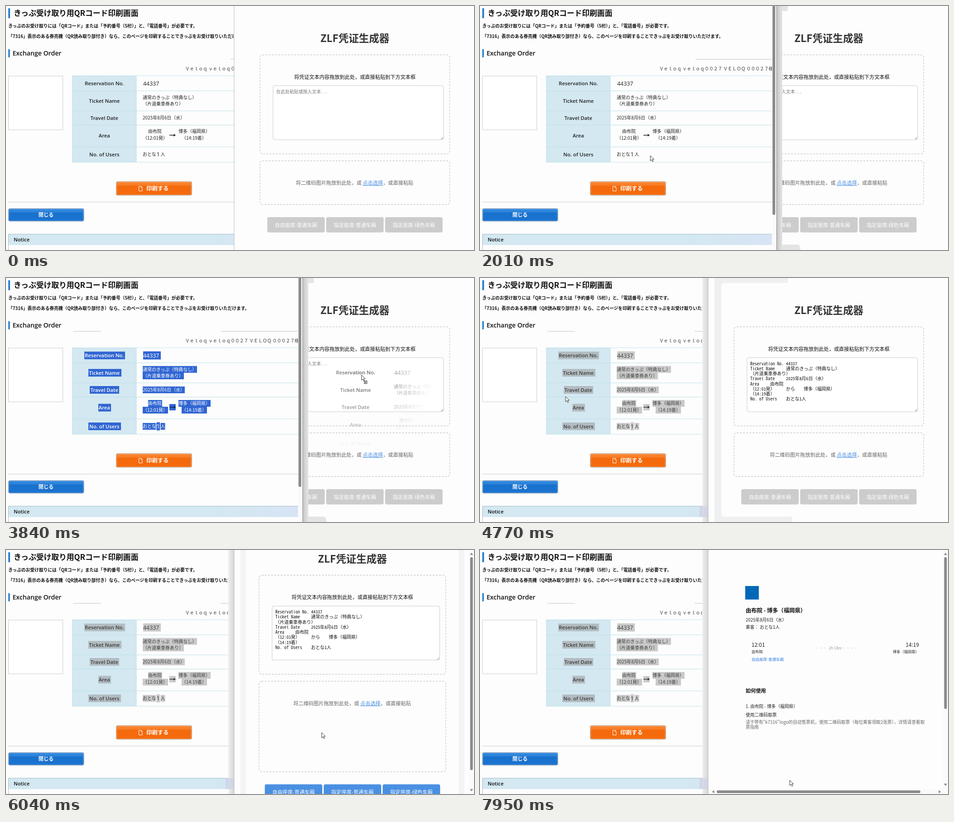
An HTML page that plays this animation: 1034 by 542 pixels, repeating every 8000 ms.

```html
<!DOCTYPE html>
<html lang="ja">
<head>
<meta charset="utf-8">
<style>
html, body { margin: 0; width: 100%; height: 100%; overflow: hidden; background: #fdfdfd; }
svg { display: block; width: 1034px; height: 542px; }
text { font-family: "Noto Sans CJK JP", "Noto Sans CJK SC", sans-serif; white-space: pre; }
.la { font-family: "Open Sans", "Noto Sans CJK JP", sans-serif; }
.sc { font-family: "Noto Sans CJK SC", "Noto Sans CJK JP", sans-serif; }
.mo { font-family: "Noto Sans Mono CJK JP", "Noto Sans Mono CJK SC", monospace; }
</style>
</head>
<body>
<svg id="stage" viewBox="0 0 1034 542"></svg>
<script>
const $ = id => document.getElementById(id);

// y is the vertical middle of the line
const text = (x, y, size, str, o = {}) =>
  `<text x="${x}" y="${(y + size * 0.37).toFixed(2)}" font-size="${size}" fill="${o.fill || '#222'}"` +
  ` font-weight="${o.w || 400}" text-anchor="${o.a || 'start'}" class="${o.c || ''}">${str}</text>`;
const rect = (x, y, w, h, fill, more = '') =>
  `<rect x="${x}" y="${y}" width="${w}" height="${h}" fill="${fill}" ${more}/>`;
const line = (x1, y1, x2, y2, stroke, w = 1) =>
  `<path d="M${x1} ${y1}L${x2} ${y2}" stroke="${stroke}" stroke-width="${w}" fill="none"/>`;
const path = (d, fill, more = '') => `<path d="${d}" fill="${fill}" ${more}/>`;
const group = (id, body, more = '') => `<g id="${id}" ${more}>${body}</g>`;

// ---- selectable table contents, in reading order: x, y, text, x0, x1
const label = (y, str, x0, x1) =>
  ({ x0, x1, y, h: 17, head: true, svg: text(217.3, y, 11.3, str, { c: 'la', w: 600, a: 'middle', fill: 'inherit' }) });
const value = (x, y, str, x1, size = 10, h = 15) =>
  ({ x0: x, x1, y, h, svg: text(x, y, size, str, { c: size > 11 ? 'la' : '', fill: 'inherit' }) });
const items = [
  label(172, 'Reservation No.', 173, 263), value(303, 172, '44337', 342, 12.4, 18),
  label(210.5, 'Ticket Name', 182, 255), value(302, 203, '通常のきっぷ（特典なし）', 422),
  value(302, 217.5, '（片道乗車券あり）', 393),
  label(248.5, 'Travel Date', 185, 250), value(302, 248.5, '2025年8月6日（水）', 395),
  label(288, 'Area', 204, 232), value(314, 278.5, '由布院', 345),
  value(302, 293.5, '（12:01発）', 358),
  { x0: 361, x1: 375, y: 287, h: 14,
    svg: '<path d="M361 287h11" stroke="inherit" stroke-width="1.5" class="arrow"/><path d="M370.5 284l4.500 3l-4.500 3z"/>' },
  value(381, 278.5, '博多（福岡県）', 452), value(388, 293.5, '（14:19着）', 444),
  label(329.5, 'No. of Users', 182, 254), value(302, 329.5, 'おとな', 331),
  value(332.5, 329.5, '1', 340, 13, 18), value(341.5, 329.5, '人', 351.5)
];
const itemSvg = (it, cls) =>
  `<g class="${cls}" fill="#222">` + (cls === 'item' ? rect(it.x0, it.y - it.h / 2, it.x1 - it.x0, it.h, 'none') : '') +
  it.svg.replace('stroke="inherit"', 'stroke="#111"') + '</g>';

// ---- booking page on the left
const rows = [155, 188.5, 233, 264.5, 313, 347];
function booking() {
  const bold = { w: 700, fill: '#111' };
  return rect(0, 0, 656, 542, '#fdfdfd') +
    rect(5, 5, 4, 22, '#2a80d6') +
    text(17, 16, 16.8, 'きっぷ受け取り用QRコード印刷画面', bold) +
    text(5, 44, 9.75, 'きっぷのお受け取りには「QRコード」または「予約番号（5桁）」と、「電話番号」が必要です。', bold) +
    text(5, 67.500, 9.75, '「7316」表示のある券売機（QR読み取り部付き）なら、このページを印刷することできっぷをお受け取りいただけます。', bold) +
    rect(5, 96, 3.5, 18, '#2a80d6') +
    text(14.5, 105, 14.1, 'Exchange Order', { c: 'la', w: 600, fill: '#111' }) +
    text(396, 139, 9.8, 'Ｖｅｌｏｑ ｖｅｌｏｑ００２７ ＶＥＬＯＱ ０００２７様', { fill: '#333' }) +
    group('rule', '') +
    rect(5.5, 155.5, 120, 119.500, '#fff', 'stroke="#ccc"') +
    rect(146, 155, 142, 192, '#d3e8f1') +
    rows.map(y => line(146, y, 645, y, '#bfe0e8')).join('') +
    line(288, 155, 288, 347, '#bfe0e8') + line(146.5, 155, 146.5, 347, '#bfe0e8') +
    items.map(it => itemSvg(it, 'item')).join('') +
    rect(243.5, 390, 167, 30.5, 'url(#orange)', 'rx="3" stroke="#aaa"') +
    rect(244.8, 391.3, 164.4, 28, 'none', 'rx="2" stroke="#ffb27a" stroke-width=".8"') +
    path('M293.500 400.500h5l2.500 2.500v8h-7.500zM298.500 400.500v2.500h2.500', 'none', 'stroke="#fff"') +
    text(310, 405, 12.4, '印刷する', { w: 700, fill: '#fff' }) +
    line(5, 435.5, 645, 435.5, '#ccc') +
    rect(5.5, 450, 166.5, 28, 'url(#blue)', 'rx="3" stroke="#999"') +
    rect(6.700, 451.2, 164, 25.6, 'none', 'rx="2" stroke="#5aa4ea" stroke-width=".8"') +
    text(88.5, 463.5, 11.2, '閉じる', { w: 700, fill: '#fff', a: 'middle' }) +
    rect(5, 507, 640, 24, 'url(#notice)') +
    path('M645 506.800H5.500V542', 'none', 'stroke="#9fbccb"') +
    text(17, 519, 11.2, 'Notice', { c: 'la', w: 600, fill: '#111' });
}

// ---- voucher form on the right
const buttons = ['自由座席-普通车厢', '指定座席-普通车厢', '指定座席-绿色车厢'];
const ticketText = [
  [[0, 'Reservation No. 44337']],
  [[0, 'Ticket Name'], [79, '通常のきっぷ（特典なし）']],
  [[0, '（片道乗車券あり）']],
  [[0, 'Travel Date'], [79, '2025年8月6日（水）']],
  [[0, 'Area'], [44, '由布院']],
  [[0, '（12:01発）'], [79, 'から'], [118, '博多（福岡県）']],
  [[0, '（14:19着）']],
  [[0, 'No. of Users'], [79, 'おとな1人']]
];
const mono = (x, y) => ticketText.map((row, i) => row.map(([dx, s]) =>
  text(x + dx, y + i * 11.25, 9.9, s, { c: 'mo', fill: '#111' })).join('')).join('');

function form(cx, half, dy, grow, active) {
  const x = cx - half, w = half * 2, sc = (fill, wt) => ({ c: 'sc', fill, w: wt, a: 'middle' });
  const dashed = (y, h) => rect(x, y + dy, w, h, 'none', 'rx="6" stroke="#ccc" stroke-width="1.4" stroke-dasharray="4.200 2.800"');
  const tx = x + 29, tw = w - 42.5, ex = tx + tw, ey = 297 + dy;
  const hint = cx - 130.5;
  return text(cx, 72 + dy, 22.5, 'ZLF凭证生成器', sc('#333', 700)) +
    dashed(108.5, 220) + dashed(344, 97 + grow) +
    text(cx, 157.5 + dy, 11.2, '将凭证文本内容拖放到此处，或直接粘贴到下方文本框', sc('#111', 500)) +
    rect(tx, 177 + dy, tw, 120, '#fff', 'rx="3" stroke="#ccc"') +
    line(ex - 6, ey - 1, ex - 1, ey - 6, '#888') + line(ex - 3, ey - 1, ex - 1, ey - 3, '#888') +
    (active ? '' : group('empty', text(tx + 7, 190, 9.9, '在此处粘贴或拖入文本...', { c: 'mo', fill: '#777' }))) +
    group(active ? 'typed2' : 'typed', mono(tx + 7, 190 + dy)) +
    text(hint, 393 + dy, 11.2, '将二维码图片拖放到此处，或 <tspan fill="#4a90e2" text-decoration="underline">点击选择</tspan>，或直接粘贴', { c: 'sc', fill: '#666' }) +
    buttons.map((s, i) => rect(cx - 193.5 + i * 130.2, 469 + dy + grow, 127, 34, active ? '#4a90e2' : '#ccc', 'rx="4"') +
      text(cx - 130 + i * 130.2, 486.5 + dy + grow, 11.2, s, sc('#fff', 500))).join('');
}

function result() {
  const t = (x, y, size, s, fill = '#222', w = 400, a = 'start') => text(x, y, size, s, { c: 'sc', fill, w, a });
  const dots = [735, 744, 753, 762, 804, 813, 821, 830].map(x => rect(x - .7, 217, 1.4, 1.4, '#bbb')).join('');
  return rect(586, 80, 30, 30, '#0068b7') +
    t(587, 134, 12.3, '由布院 - 博多（福岡県）', '#111', 700) +
    t(587, 155.5, 9.7, '2025年8月6日（水）') + t(587, 171, 9.7, '乘客： おとな1人') +
    t(600, 211, 11.8, '12:01', '#222', 500) + t(970, 211, 11.8, '14:19', '#222', 500, 'end') +
    t(600, 225.5, 8.3, '由布院', '#222', 500) + t(970, 225.5, 8.3, '博多（福岡県）', '#222', 500, 'end') +
    dots + t(785, 217.5, 8.3, '2h 18m', '#999', 400, 'middle') +
    t(600, 243, 8.5, '自由座席-普通车厢', '#2f7de1') +
    t(587, 312.5, 11.2, '如何使用', '#111', 700) +
    t(587, 347, 9.7, '1. 由布院 - 博多（福岡県）', '#222', 500) +
    t(587, 366.5, 9.8, '使用二维码取票', '#222', 500) +
    t(587, 382, 9.7, '请于带有"k7316"logo的自动售票机，使用二维码取票（每位乘客领取2张票），详情请查看取', '#666') +
    t(587, 393.5, 9.7, '票指南', '#666');
}

// ---- scrollbars, window edges and pointers
const grey = '#8a8a8a';
const vBar = (id, h, end) => rect(1023, 0, 11, 542, '#fafafa') +
  path(`M1025 11l3.500-5l3.500 5zM1025 ${end}l3.500 5l3.500-5z`, grey) +
  rect(1025.5, 16, 6, h, grey, `rx="3" id="${id}"`);
const hBar = rect(505, 531, 529, 11, '#fafafa') + rect(523, 534, 450, 6, grey, 'rx="3"') +
  path('M517.500 533.500l-5 3.500l5 3.500zM1013.500 533.500l5 3.500l-5 3.500z', grey);

const leftEdge = rect(645, 0, 10, 542, '#fafafa') + rect(646.3, -9, 6, 473, grey, 'rx="3"') +
  rect(655, 0, 13, 542, 'url(#shade)') + line(655.5, 0, 655.5, 542, '#858585') +
  path('M668 0h12v11h-12zM668 530h36q4 5 4 12h-40z', '#e3e4e6');
const rightEdge = rect(491, 0, 13, 542, 'url(#shade2)') + rect(485, 507, 19, 24, '#cbd0e6', 'opacity=".7"');
const bands = path('M518 0H680V11H541q-8 0-8 8V522q0 8 8 8H690V542H518z', '#eff0f2');
const bands2 = rect(518, 0, 12, 542, '#f3f4f6') + rect(1000, 0, 13, 542, '#f3f4f6');

const arrow = path('M.5.5v11.500l2.700-2.500l2 4.200l1.900-.9l-2-4.100h3.400z', '#fff', 'stroke="#222" stroke-width=".9"');
const plus = rect(6.5, 13.5, 6, 6, '#fff', 'stroke="#333"') + path('M9.500 14.500v4M7.500 16.500h4', 'none', 'stroke="#333"');
const noDrop = '<circle r="4.700" fill="#fff" stroke="#d0202c" stroke-width="1.800"/>' + line(-3.3, -3.3, 3.3, 3.3, '#d0202c', 1.8);

const grad = (id, a, b, dir) => `<linearGradient id="${id}" ${dir}><stop stop-color="${a}"/><stop offset="1" stop-color="${b}"/></linearGradient>`;
const down = 'x2="0" y2="1"';
$('stage').innerHTML = `<defs>
  <linearGradient id="orange" ${down}><stop stop-color="#fb8a35"/><stop offset=".3" stop-color="#f87a22"/><stop offset=".31" stop-color="#f46a0c"/><stop offset="1" stop-color="#f46a0c"/></linearGradient>
  <linearGradient id="blue" ${down}><stop stop-color="#3a8ee2"/><stop offset=".3" stop-color="#2780d8"/><stop offset=".31" stop-color="#1a72cf"/><stop offset="1" stop-color="#1a72cf"/></linearGradient>
  ${grad('notice', '#d3e8f1', '#d8e4f5', 'x1=".7"')}${grad('shade', '#c4c4c4', '#e6e6e6', '')}${grad('shade2', '#f0f0f0', '#d6d6d6', '')}
  <clipPath id="clip"><rect id="pane" width="504" height="542"/></clipPath>
  <radialGradient id="fade" gradientUnits="userSpaceOnUse" cx="225" cy="177" r="165">
    <stop stop-color="#fff" stop-opacity=".75"/><stop offset=".5" stop-color="#fff" stop-opacity=".45"/><stop offset="1" stop-color="#fff" stop-opacity="0"/></radialGradient>
  <mask id="soft" maskUnits="userSpaceOnUse" x="0" y="0" width="700" height="542">${rect(0, 0, 700, 542, 'url(#fade)')}</mask></defs>` +
  rect(0, 0, 1034, 542, '#fdfdfd') +
  group('bands', bands) + group('bands2', bands2) +
  group('form1', form(770.7, 209.7, 0, 0, false)) +
  group('form2', form(765.3, 206.3, -52.500, 104, true)) +
  group('result', result()) +
  group('bars1', vBar('thumb', 473, 531)) + group('bars2', vBar('thumb2', 337, 519) + hBar) +
  group('left', booking(), 'clip-path="url(#clip)"') +
  group('edgeL', leftEdge) + group('edgeR', rightEdge) + group('seam', line(504, 0, 504, 542, '#bbb')) +
  group('ghost', items.map(it => itemSvg(it, 'copy')).join(''), 'mask="url(#soft)"') +
  group('image', rect(0, 0, 104, 105, '#d0d0d0', 'opacity=".75"')) +
  group('pointer', arrow) + group('plus', arrow + plus) + group('noDrop', noDrop);

// ---- timing
const track = (keys, t) => {
  const i = keys.findIndex(k => k[0] > t);
  if (i < 0) return keys[keys.length - 1].slice(1);
  if (!i) return keys[0].slice(1);
  const a = keys[i - 1], b = keys[i], p = (t - a[0]) / (b[0] - a[0]);
  return [a[1] + (b[1] - a[1]) * p, a[2] + (b[2] - a[2]) * p];
};
const mouse = [[260, 700, 536], [520, 585, 440], [800, 462, 345], [1020, 425, 311], [1070, 424, 305], [1250, 400, 316],
  [1480, 376, 332], [2010, 376, 332], [2200, 354, 336], [2500, 262, 258], [2800, 157, 170], [2850, 157, 170], [2930, 154, 165],
  [3120, 154, 165], [3260, 222, 175], [3560, 222, 175], [3680, 470, 188], [3840, 785, 215], [4070, 794, 214],
  [4260, 794, 214], [4500, 520, 250], [4770, 189, 263], [5050, 55, 222], [5110, 55, 222], [5380, 411, 318],
  [5620, 610, 378], [5850, 697, 405], [6040, 697, 405], [6350, 692, 460], [6660, 688, 501], [6870, 688, 501], [7200, 684, 511]];
const picture = [[5110, 13, 163], [5380, 289, 235], [5620, 545, 315], [5850, 655, 346]];

const show = (id, on) => $(id).style.display = on ? '' : 'none';
const move = (id, x, y) => $(id).setAttribute('transform', `translate(${x.toFixed(2)} ${y.toFixed(2)})`);
const within = (t, a, b) => t >= a && t < b;
const cells = [...document.querySelectorAll('.item')];

function draw(t) {
  const raised = within(t, 2010, 4260) || within(t, 5110, 6040);
  const pasted = t >= 4260, dropped = t >= 6040, done = t >= 7670;
  $('pane').setAttribute('width', raised ? 656 : 504);
  show('edgeL', raised);
  show('edgeR', !raised && pasted);
  show('seam', !raised);
  show('bands', !raised && within(t, 4260, 6040));
  show('bands2', dropped && !done);
  show('form1', !dropped);
  show('form2', dropped && !done);
  show('result', done);
  show('bars1', dropped && !done);
  show('bars2', done);
  show('empty', !pasted);
  show('typed', pasted);

  const scroll = Math.min(1, Math.max(0, (t - 6870) / 280));
  move('form2', 0, -41 * scroll);
  move('thumb', 0, 38 * scroll);

  const rule = x => line(x, 118.5, 645, 118.5, '#ddd', 2);
  $('rule').innerHTML = rule(t < 2010 ? 496 : t < 4260 ? 476 : 474) +
    (t >= 3260 ? line(149, 118.500, 210, 118.500, '#ddd', 2) : '');

  // selection grows backwards from the last cell
  const picked = Math.floor(Math.max(0, (t - 2200) / 580) * items.length);
  cells.forEach((g, i) => {
    const on = items.length - i <= picked;
    const fill = !on ? 'none' : raised ? '#3066d2' : items[i].head ? '#b2bcc1' : '#c9c9c9';
    const ink = !on ? '#222' : i === 10 ? (raised ? '#0c2050' : '#333') : raised ? '#fff' : '#3c3c3c';
    g.firstChild.setAttribute('fill', fill);
    g.setAttribute('fill', ink);
    const shaft = g.querySelector('.arrow');
    if (shaft) shaft.setAttribute('stroke', ink);
  });

  const [x, y] = track(mouse, t), [px, py] = track(picture, t);
  const textDrag = within(t, 3560, 4260), imageDrag = within(t, 5110, 6040);
  const blocked = (textDrag || imageDrag) && x < 656;
  show('ghost', textDrag);
  move('ghost', x - 230, y - 177);
  show('image', imageDrag);
  move('image', px, py);
  show('pointer', t >= 260 && !textDrag && !imageDrag);
  show('plus', (textDrag || imageDrag) && !blocked);
  show('noDrop', blocked);
  ['pointer', 'plus', 'noDrop'].forEach(id => move(id, x, y));
}

const start = performance.now();
function tick() {
  draw((performance.now() - start) % 8000);
  requestAnimationFrame(tick);
}
tick();
</script>
</body>
</html>
```
